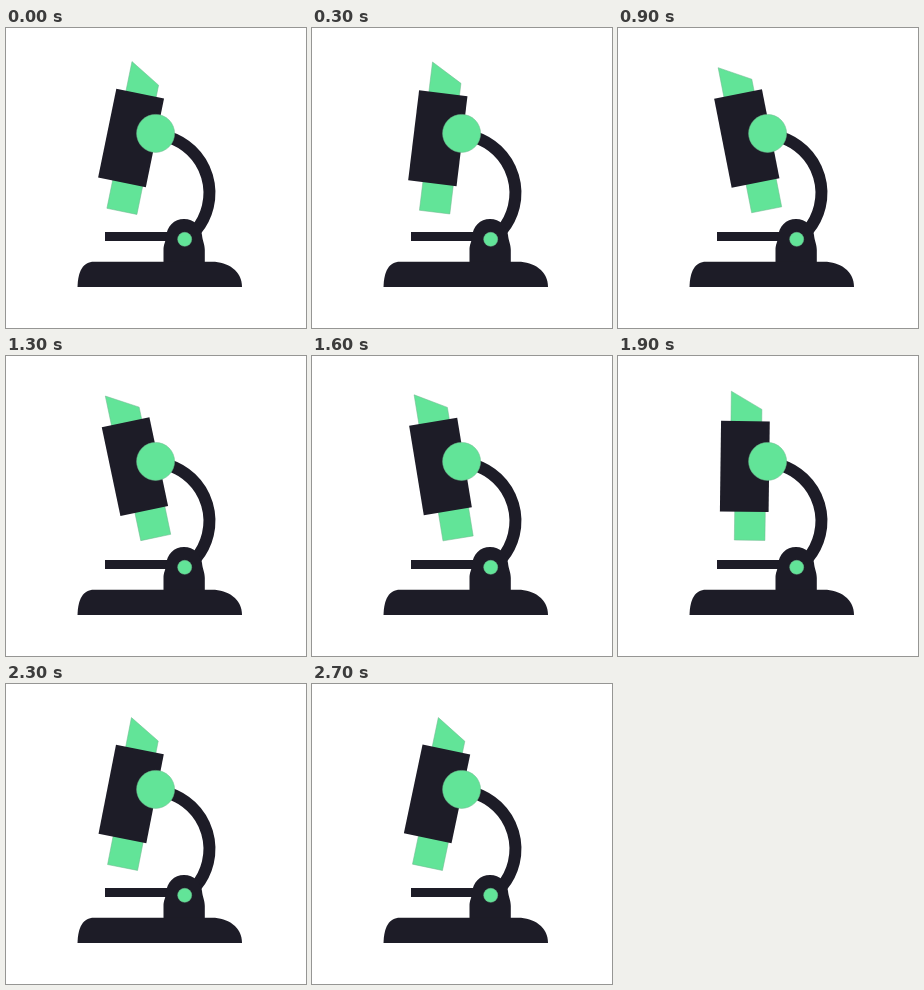
Write an HTML page that moves like this. It is 300x300 px and loops after 2.8 s.

```html
<!DOCTYPE html>
<html lang="en">
<head>
<meta charset="utf-8">
<title>Microscope</title>
<style>
  html, body { margin: 0; width: 100%; height: 100%; overflow: hidden; background: #fff; }
  svg { display: block; width: 100%; height: 100%; }
  .dark { fill: #1d1c27; }
  .green { fill: #62e498; stroke: #6fb98f; stroke-width: .5; }
  .arm { fill: none; stroke: #1d1c27; stroke-width: 12; }
</style>
</head>
<body>
<svg viewBox="0 0 300 300">
  <path class="arm" d="M162 109A58.5 58.5 0 0 1 189.8 202.5"/>
  <g id="tube">
    <path class="green" d="M112.5 35.4L143.3 53.2V70H112.5Z"/>
    <path class="green" d="M117.4 150H148V184.2H117.4Z"/>
    <path class="dark" d="M102.6 65.1H151.3V155.8H102.6Z"/>
  </g>
  <circle class="green" cx="149.6" cy="105.4" r="19"/>
  <path class="dark" d="M99 204H164V213H99Z"/>
  <path class="dark" d="M157.5 236V222C157.5 216 159.7 214 160 209C161 198 168 191 178 191C188 191 195 198 196 207C196.5 213 198.8 216 198.8 222V236Z"/>
  <path class="dark" d="M71.5 259C72 243 77 233.7 88 233.7H206C222 233.7 236 243 236 259Z"/>
  <circle class="green" cx="178.7" cy="211.3" r="7"/>
</svg>
<script>
  const LOOP = 2800, HALF = LOOP / 2, STEP = 100;
  const MID = 483, REACH = 610, SWING = 11.9;
  const tube = document.getElementById('tube');

  // Symmetric cubic ease on -1..1, solved by bisection.
  function ease(u) {
    let lo = -1, hi = 1;
    for (let i = 0; i < 30; i++) {
      const q = (lo + hi) / 2;
      if (0.675 * q + 0.325 * q ** 3 < u) lo = q; else hi = q;
    }
    return (3 * lo - lo ** 3) / 2;
  }

  function angle(t) {
    const shifted = (t - MID + HALF / 2 + LOOP) % LOOP;
    const dir = shifted < HALF ? -1 : 1;
    const u = (shifted % HALF - HALF / 2) / REACH;
    return dir * SWING * ease(Math.max(-1, Math.min(1, u)));
  }

  function draw(ms) {
    const t = Math.floor((ms % LOOP) / STEP) * STEP;
    tube.setAttribute('transform', `rotate(${angle(t).toFixed(3)} 128.3 101)`);
  }

  const start = performance.now();
  function tick() {
    draw(performance.now() - start);
    requestAnimationFrame(tick);
  }
  tick();
</script>
</body>
</html>
```
